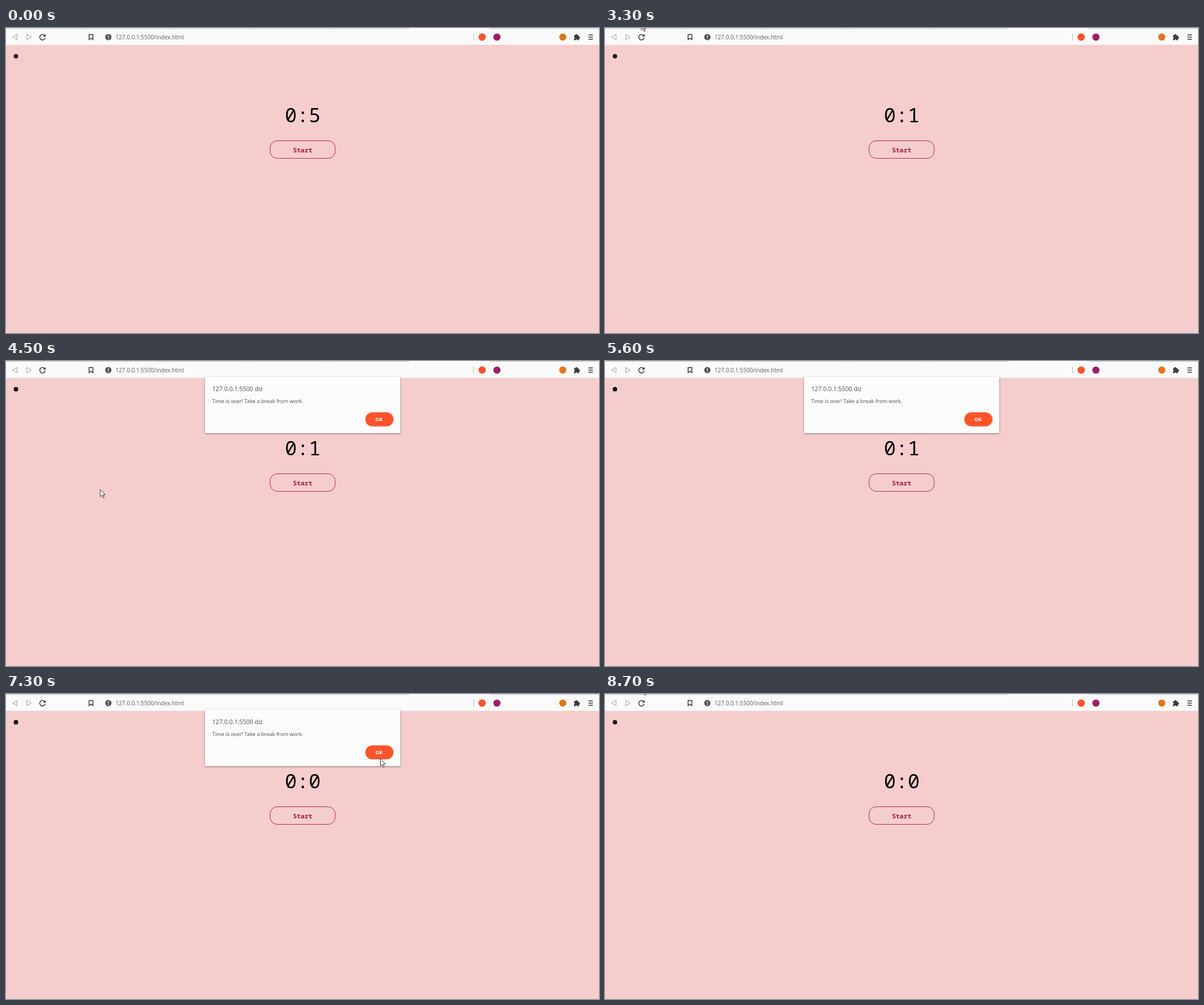
An HTML page for the animation above (8.9 s loop, 1043 px wide and 537 px high).

```html
<!DOCTYPE html>
<html lang="en">
<head>
<meta charset="utf-8">
<title>Countdown</title>
<style>
  html, body { margin: 0; width: 100%; height: 100%; overflow: hidden; background: #f6cdcd; }
  svg { display: block; width: 100%; height: 100%; }
  text { font-family: "Open Sans", "Noto Sans", sans-serif; }
  .mono { font-family: "Noto Sans Mono", "DejaVu Sans Mono", monospace; text-anchor: middle; }
  .line { fill: none; stroke: #333; stroke-width: 1.4; }
  .off { stroke: #b4b4b4; stroke-width: 1.2; stroke-linejoin: round; }
  #panel { filter: drop-shadow(0 1px 1.5px rgba(0, 0, 0, .45)); }
</style>
</head>
<body>
<svg viewBox="0 0 1043 537" preserveAspectRatio="none">
  <rect width="1043" height="537" fill="#f6cdcd"/>

  <g id="toolbar">
    <rect width="1043" height="30" fill="#fafafa"/>
    <path d="M0 29.5H1043" stroke="#f1ecec"/>
    <path d="M0 .75H709.5M851.5 .75H1043" stroke="#d3d4d6" stroke-width="1.5"/>
    <path d="M143.5 0V1.5M285.5 0V1.5M427.5 0V1.5M568.5 0V1.5" stroke="#a8a8a8"/>
    <path class="line off" d="M19.5 11.2V20.8L11.5 16ZM36.5 11.2V20.8L44.3 16Z"/>
    <path class="line" d="M68.2 13.6A4.8 4.8 0 1 0 68.9 17.2"/>
    <path d="M69.7 10.8V15.2H65.3Z" fill="#333"/>
    <path class="line" d="M146.2 11.5H152.8V20.6L149.5 18L146.2 20.6Z"/>
    <circle cx="180" cy="16" r="5.5" fill="#515256"/>
    <path d="M180 12.8V16.8M180 18V19.4" stroke="#fff" stroke-width="1.4"/>
    <text x="192.7" y="19.8" font-size="9.95" fill="#5a5b5e">127.0.0.1:5500/index.html</text>
    <path d="M822.5 10V22" stroke="#b9b9b9"/>
    <circle cx="837.5" cy="16" r="6.5" fill="#fb542b"/>
    <circle cx="863.5" cy="16" r="6.3" fill="#9e1f63"/>
    <circle cx="979.3" cy="16" r="6.2" fill="#e2761b"/>
    <path d="M999 12.8H1001.6A1.7 1.7 0 1 1 1004.9 12.8H1007.6V15.3A1.7 1.7 0 1 1 1007.6 18.6V21.4H1004.9A1.7 1.7 0 0 0 1001.6 21.4H999V18.6A1.7 1.7 0 0 0 999 15.3Z" fill="#3b3c3f"/>
    <path class="line" d="M1024.5 12.3H1032.2M1024.5 16H1032.2M1024.5 19.7H1032.2"/>
  </g>

  <circle id="dot" cx="17.5" cy="49.7" r="3.9"/>
  <text id="count" class="mono" x="522" y="166.2" font-size="35"></text>
  <rect x="464.5" y="198.5" width="114.5" height="31" rx="12.5" fill="none" stroke="#b02a50"/>
  <text class="mono" x="521.8" y="218.9" font-size="11.4" font-weight="700" fill="#a1163f">Start</text>

  <g id="dialog">
    <path id="panel" fill="#fcfcfc"/>
    <text x="362.8" y="52.6" font-size="10.6" fill="#4b4c50">127.0.0.1:5500 diz</text>
    <text x="362.6" y="74.3" font-size="9.28" fill="#4b4c55">Time is over! Take a break from work.</text>
    <rect id="ok" x="632" y="90.5" width="49.5" height="24.5" rx="12.25" fill="#fb542b" stroke="#fd8c70"/>
    <text x="656.2" y="105.8" font-size="8.8" font-weight="700" fill="#fff" text-anchor="middle">OK</text>
  </g>

  <path id="cursor" d="M0 0V12.6L2.9 10L4.9 14.8L6.8 14L4.8 9.3H8.7Z" fill="#fff" stroke="#222" stroke-width=".9"/>
</svg>

<script>
const LOOP = 8900, STEP = 100;
const OPEN = 4200, CLOSE = 7300;
const $ = id => document.getElementById(id);
const [dot, count, dialog, panel, ok, cursor] =
  ["dot", "count", "dialog", "panel", "ok", "cursor"].map($);

const clamp = k => Math.max(0, Math.min(1, k));
const smooth = k => k * k * (3 - 2 * k);
const mix = (a, b, k) => a + (b - a) * k;

// Pointer moves; sag bends the path downwards
const home = [6, -15];
const moves = [
  { from: 300, until: 700, to: [363, 145] },
  { from: 1700, until: 2200, to: [62, 5] },
  { from: 2300, until: 2800, to: [64, -9] },
  { from: 3500, until: 4300, to: [119.6, 195] },
  { from: 4300, until: 5000, to: [353, 144], sag: 65 },
  { from: 5100, until: 6000, to: [592, 88] },
  { from: 6300, until: 6900, to: [653, 104] },
  { from: 7200, until: CLOSE, to: [658.5, 114] },
  { from: CLOSE, until: 8100, to: [77, 13], sag: 240 },
  { from: 8500, until: 8700, to: [65, -13] }
];
const ticks = [400, 1300, 2200, 3300, CLOSE];

function tipAt(t) {
  let [x, y] = home;
  for (const { from, until, to, sag = 0 } of moves) {
    const k = smooth(clamp((t - from) / (until - from)));
    x = mix(x, to[0], k);
    y = mix(y, to[1], k) + sag * 4 * k * (1 - k);
  }
  return [x, y];
}

function draw(time) {
  const t = Math.floor(time % LOOP / STEP) * STEP;
  count.textContent = "0:" + (5 - ticks.filter(x => t >= x).length);

  const level = clamp(Math.min((t - OPEN) / 185, 1 - (t - CLOSE) / 200));
  const tilt = (1 - level) * 2.5;
  dialog.style.display = level ? "" : "none";
  dialog.setAttribute("opacity", level);
  dialog.setAttribute("transform", `translate(0 ${(level - 1) * 19.5})`);
  panel.setAttribute("d", `M${350 + tilt} 27.5H${693.5 - tilt}L${693.5 + tilt} 127H${350 - tilt}Z`);
  ok.setAttribute("stroke-opacity", t < 6500 ? 1 : 0);
  dot.setAttribute("fill", level ? "#000" : "#1c1a1a");

  // The pointer is not visible while it is over the message
  cursor.style.display = t >= 5400 && t < 5800 ? "none" : "";
  cursor.setAttribute("transform", `translate(${tipAt(t)})`);
}

const start = performance.now();
function loop() {
  draw(performance.now() - start);
  requestAnimationFrame(loop);
}
loop();
</script>
</body>
</html>
```
